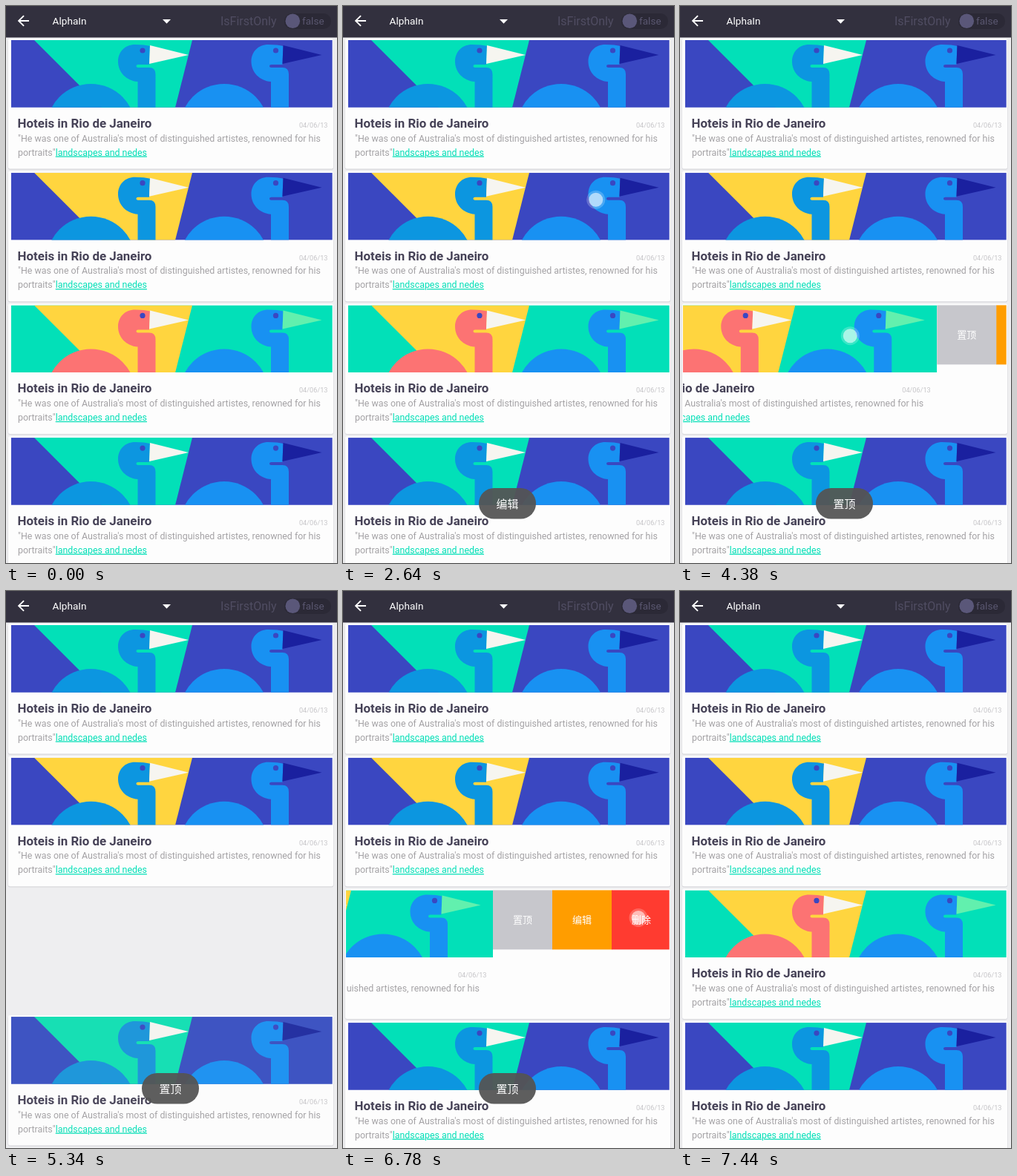
Animation of 446x751 px, one loop 8.76 s. Source, as an HTML page:

```html
<!DOCTYPE html>
<html lang="en">
<head>
<meta charset="utf-8">
<title>Swipe list</title>
<style>
  html, body { margin: 0; width: 100%; height: 100%; overflow: hidden; background: #eeeef0; }
  svg { display: block; font-family: Roboto, sans-serif; }
  .title { font-size: 16.9px; font-weight: 700; fill: #464257; }
  .body { font-size: 12.4px; fill: #a4a2a5; }
  .link { fill: #02dfb7; text-decoration: underline; }
  .date { font-size: 9.2px; fill: #c6c5c8; text-anchor: end; }
  .cjk { font-family: "Noto Sans CJK SC", "Noto Sans CJK", sans-serif; fill: #fff; text-anchor: middle; }
</style>
</head>
<body>
<svg id="stage" width="446" height="751" viewBox="0 0 446 751">
  <defs>
    <clipPath id="cardClip"><rect x="4" y="-1" width="435.7" height="173"/></clipPath>
    <clipPath id="imageClip"><rect x="7" width="435" height="90.7"/></clipPath>
    <g id="bird">
      <circle cx="114.5" cy="119" r="60"/>
      <path d="M174 6C160 6 151 16 151 29C151 43 162 55 177.5 56V91H201.5V46Q201.5 37 193 37H179Q175.5 37 175.5 35Q175.5 33 178 33H193L194 8Q187 6 174 6Z"/>
      <circle cx="184" cy="14" r="3.6" fill="#3a47c1"/>
    </g>
    <path id="beak" d="M194 7L246 20L193 32Z"/>
  </defs>
  <g id="cards"></g>
  <g id="header">
    <rect width="446" height="42.5" fill="#32303e"/>
    <path transform="translate(12 8.6) scale(.95)" fill="#fff" d="M20 11H7.83l5.59-5.59L12 4l-8 8 8 8 1.41-1.41L7.83 13H20z"/>
    <text x="62.6" y="25" font-size="13.6" fill="#fff">AlphaIn</text>
    <path d="M211 18h11l-5.5 5.7z" fill="#fff"/>
    <text x="289" y="26" font-size="16" fill="#504d62">IsFirstOnly</text>
    <rect x="375" y="10" width="63" height="21" rx="10" fill="#2b2936"/>
    <circle cx="386.3" cy="20.3" r="9.8" fill="#5a5779"/>
    <text x="399" y="25" font-size="13.6" fill="#5a5770">false</text>
  </g>
  <g id="toast">
    <rect x="183" y="650" width="77" height="41.5" rx="20.5" fill="#545454" fill-opacity=".94"/>
    <text id="toastText" class="cjk" x="221.5" y="676.5" font-size="14.9"></text>
  </g>
  <g id="dot" fill="#fff">
    <circle r="12.5" fill-opacity=".22"/>
    <circle r="9.5" fill-opacity=".57"/>
  </g>
</svg>
<script>
const LOOP = 8760, TOP = 46, STEP = 178.7, OPEN = 240;
const BLUE = '#3a47c1', TEAL = '#02e0b8', YELLOW = '#ffd53f', NAVY = '#1a209f', SKY = '#0c96e0';
const looks = [
  { base: BLUE, wedge: TEAL, bird: SKY, beak: NAVY },
  { base: BLUE, wedge: YELLOW, bird: SKY, beak: NAVY },
  { base: TEAL, wedge: YELLOW, bird: '#fc7373', beak: '#62f0ae' },
];
const $ = id => document.getElementById(id);
const clamp = v => Math.min(1, Math.max(0, v));
const ramp = (t, from, length) => clamp((t - from) / length);
const smooth = p => p * p * (3 - 2 * p);
const cosine = p => (1 - Math.cos(Math.PI * p)) / 2;

const button = (label, color, i) => `
  <rect x="${442 + 80 * i}" width="80.5" height="80" fill="${color}"/>
  <text class="cjk" x="${482 + 80 * i}" y="45" font-size="13">${label}</text>`;

function makeCard(slot, look) {
  const g = document.createElementNS('http://www.w3.org/2000/svg', 'g');
  g.innerHTML = `
    <rect x="2.5" y="-1" width="439" height="175.7" rx="3" fill="#d8d8dc"/>
    <rect x="3" y="-2" width="438" height="175.5" rx="2.5" fill="#fdfdfd"/>
    <g clip-path="url(#cardClip)"><g class="slide">
      <g clip-path="url(#imageClip)">
        <rect x="7" width="435" height="91" fill="${look.base}"/>
        <path d="M38 0H251L228 91H129Z" fill="${look.wedge}"/>
        <use href="#bird" fill="${look.bird}"/>
        <use href="#beak" fill="#f6f5f0"/>
        <use href="#bird" x="179.5" fill="#1891f2"/>
        <use href="#beak" x="179.5" fill="${look.beak}"/>
      </g>
      <text class="title" x="15.6" y="118">Hoteis in Rio de Janeiro</text>
      <text class="date" x="433.5" y="118">04/06/13</text>
      <text class="body" x="16" y="136.5">"He was one of Australia's most of distinguished artistes, renowned for his</text>
      <text class="body" x="16" y="155.5">portraits"<tspan class="link">landscapes and nedes</tspan></text>
      ${button('置顶', '#c7c7cc', 0)}${button('编辑', '#ff9d00', 1)}${button('删除', '#ff3b30', 2)}
    </g></g>`;
  $('cards').append(g);
  const slide = g.querySelector('.slide');
  return {
    place(shift, alpha = 1, offset = 0) {
      g.setAttribute('transform', `translate(0 ${TOP + STEP * (slot - shift)})`);
      g.setAttribute('opacity', alpha);
      g.style.display = alpha > 0 ? '' : 'none';
      slide.setAttribute('transform', `translate(${offset} 0)`);
    },
  };
}

const cards = [0, 1, 2, 3, 4].map(i => makeCard(i, looks[i % 3]));
// Rebound copies that fade in while the rows below a deleted one move up.
const rebound = [3, 4].map(i => makeCard(i, looks[(i - 1) % 3]));

const swipes = [
  { card: 0, start: 480, length: 340, close: 1600, closing: 240 },
  { card: 1, start: 2640, length: 280, close: 3550, closing: 160 },
  { card: 2, start: 4260, length: 280, remove: 5187 },
  { card: 2, start: 6000, length: 280, remove: 7047 },
];
const taps = [
  { from: 1500, to: 1610, x: 324, y: 78 },
  { from: 3480, to: 3590, x: 242, y: 261 },
  { from: 5040, to: 5160, x: 398, y: 440.5 },
  { from: 6780, to: 7000, x: 398, y: 440.5 },
];
const FADE = 120, MOVE = 250;

function draw(t) {
  const offsets = [0, 0, 0];
  let fade = 0, move = 0;
  let dot = taps.find(p => t >= p.from && t < p.to);

  for (const s of swipes) {
    const end = s.remove ? s.remove + FADE + MOVE : s.close + s.closing;
    if (t < s.start || t >= end) continue;
    const closed = s.close ? smooth(ramp(t, s.close, s.closing)) : 0;
    const offset = -OPEN * smooth(ramp(t, s.start, s.length)) * (1 - closed);
    offsets[s.card] = offset;
    if (t < s.start + s.length * .72) {
      dot = {
        x: 341 + offset - 16 * ramp(t, s.start, 60),
        y: TOP + STEP * s.card + 36.5 - offset * .05,
      };
    }
    if (s.remove) {
      fade = cosine(ramp(t, s.remove, FADE));
      move = cosine(ramp(t, s.remove + FADE, MOVE));
    }
  }

  cards.forEach((card, i) => {
    if (i < 3) card.place(0, i === 2 ? 1 - fade : 1, offsets[i]);
    else card.place(move, 1 - move);
  });
  rebound.forEach(card => card.place(move, move));

  $('toast').setAttribute('opacity', ramp(t, 1700, 300) - ramp(t, 7100, 300));
  $('toastText').textContent = t < 3600 ? '编辑' : '置顶';
  $('dot').style.display = dot ? '' : 'none';
  if (dot) $('dot').setAttribute('transform', `translate(${dot.x} ${dot.y})`);
}

function tick() {
  draw(performance.now() % LOOP);
  requestAnimationFrame(tick);
}
tick();
</script>
</body>
</html>
```
